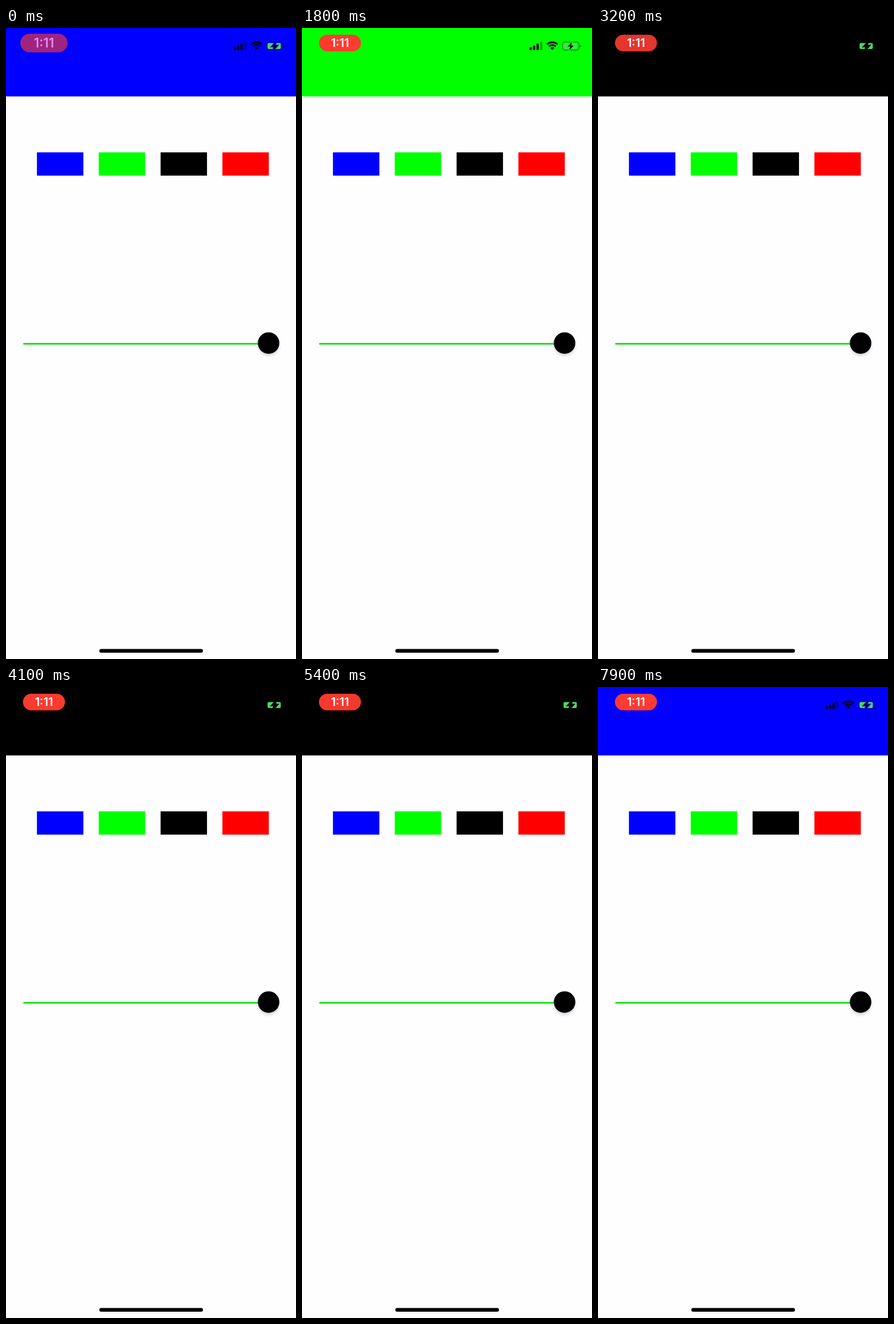
Animation, 508 px wide and 1102 px high, one loop 8 s. Source, as an HTML page:

```html
<!DOCTYPE html>
<html lang="en">
<head>
<meta charset="utf-8">
<title>Header colour picker</title>
<style>
  html, body { margin: 0; width: 100%; height: 100%; overflow: hidden; background: #fefdff; }
  svg { display: block; width: 100vw; height: 100vh; }
  text { font: 600 20px Inter, Roboto, sans-serif; text-anchor: middle; }
</style>
</head>
<body>
<svg viewBox="0 0 508 1102">
  <defs>
    <filter id="soft" x="-50%" y="-50%" width="200%" height="200%">
      <feGaussianBlur stdDeviation="3"/>
    </filter>
  </defs>
  <rect width="508" height="1102" fill="#fefdff"/>
  <rect id="header" width="508" height="119.5"/>

  <g id="pill">
    <rect id="pillBody" x="29.7" y="11.8" width="73.6" height="29" rx="14.5"/>
    <text id="clock" x="66.5" y="33.3" fill="#fff">1:11</text>
  </g>

  <g id="signal"></g>
  <g id="wifi" fill="none" stroke="#000" stroke-width="3"></g>

  <g id="battery">
    <rect x="456.5" y="24.5" width="28.8" height="14" rx="4.2" fill="none" stroke="#000" stroke-opacity=".4" stroke-width="1.3"/>
    <path d="M486.8 29.2q2 .8 2 2.3t-2 2.3z" fill-opacity=".45"/>
    <rect x="458.2" y="26.2" width="23.2" height="10.6" rx="2.4" fill="#4cd964"/>
    <path id="bolt" d="M472.6 24.8L465.6 32.2H469.8L468.4 38.4L475.5 30.8H471.2Z" stroke-width="3" paint-order="stroke"/>
  </g>

  <g id="swatches"></g>

  <rect x="30" y="550" width="425" height="3" rx="1.5" fill="#1ee01e"/>
  <circle cx="460" cy="554" r="17.5" opacity=".22" filter="url(#soft)"/>
  <circle cx="460" cy="550.2" r="18.8"/>
  <rect x="163.5" y="1084.5" width="181.5" height="6.6" rx="3.3"/>
</svg>
<script>
const LOOP = 8000, PULSE = 1925;
const BLUE = '#00f', GREEN = '#0f0', BLACK = '#000', RED = '#f00';
// [start in ms, header colour]
const taps = [
  [0, BLUE], [1600, GREEN], [3100, BLACK], [4300, RED],
  [5100, BLACK], [6500, GREEN], [7600, BLUE]
];

const $ = id => document.getElementById(id);

function add(parent, tag, attrs) {
  const node = document.createElementNS('http://www.w3.org/2000/svg', tag);
  for (const key in attrs) node.setAttribute(key, attrs[key]);
  $(parent).append(node);
}

[BLUE, GREEN, BLACK, RED].forEach((fill, i) =>
  add('swatches', 'rect', { x: 54.2 + i * 108.3, y: 217.2, width: 81.3, height: 40.6, fill }));

[5, 7.8, 11.3, 14.5].forEach((height, i) =>
  add('signal', 'rect', {
    x: 398.4 + i * 6.2, y: 38.6 - height, width: 4, height, rx: 1,
    'fill-opacity': i < 3 ? 1 : 0.3
  }));

// Wedge edges sit 43 degrees either side of vertical.
function arc(r) {
  const dx = r * Math.sin(0.75), y = 38.6 - r * Math.cos(0.75);
  return `${438.5 - dx} ${y}A${r} ${r} 0 0 1 ${438.5 + dx} ${y}`;
}
for (const r of [13.6, 8.9]) add('wifi', 'path', { d: 'M' + arc(r) });
add('wifi', 'path', { d: `M438.5 38.6L${arc(5.2)}Z`, fill: '#000', stroke: 'none' });

const mix = (a, b, k) => a + (b - a) * k;
const rgb = (from, to, k) => `rgb(${from.map((v, i) => Math.round(mix(v, to[i], k)))})`;

function draw(t) {
  const color = taps.filter(tap => tap[0] <= t).pop()[1];
  $('header').setAttribute('fill', color);
  $('bolt').setAttribute('stroke', color);

  const wave = 0.5 + 0.6 * Math.cos((t - 4100) / PULSE * 2 * Math.PI + 0.84);
  const glow = Math.max(0, Math.min(1, wave));

  // The pill settles into place at the start of the loop.
  const intro = Math.max(0, 1 - t / 400) ** 2;
  const scale = 1 + 0.125 * intro;
  $('pill').setAttribute('transform',
    `translate(66.5 26.3) scale(${scale}) translate(-66.5 -26.3)`);
  $('pillBody').setAttribute('fill', rgb([221, 52, 45], [255, 59, 48], glow));
  $('pillBody').setAttribute('fill-opacity', 1 - 0.38 * intro);
  $('clock').setAttribute('fill', rgb([255, 255, 255], [226, 140, 240], intro));
}

const start = performance.now();
function tick() {
  draw((performance.now() - start) % LOOP);
  requestAnimationFrame(tick);
}
tick();
</script>
</body>
</html>
```
